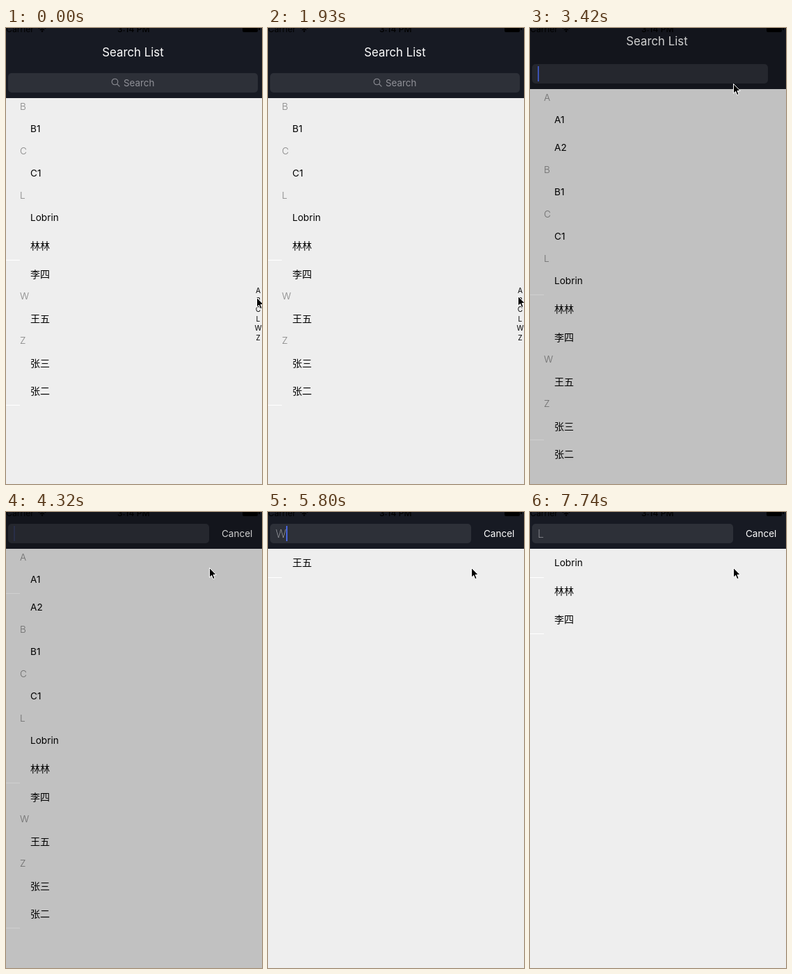
These frames come from a looping animation (368x657 px, 8000 ms). An HTML page:

```html
<!DOCTYPE html>
<html lang="zh-Hans">
<head>
<meta charset="utf-8">
<title>Search List</title>
<style>
html, body { margin: 0; width: 100%; height: 100%; overflow: hidden; background: #eee; }
body { position: relative; font: 13.6px Inter, "Noto Sans CJK SC", "Noto Sans CJK", sans-serif; color: #000; }
body *, svg { position: absolute; white-space: pre; }
#list, #header { left: 0; width: 100%; overflow: hidden; }
#list { bottom: 0; background: #eee; }
#rows { left: 0; }
#header { top: 0; background: #171a23; }
.row { left: 35px; height: 40px; line-height: 40px; }
.row.zh { font-size: 14px; font-weight: 350; }
.head { left: 20px; height: 24px; line-height: 24px; color: #858585; font-weight: 300; }
.sep { left: 0; width: 20px; height: 1px; background: #fff; }
#index { left: 352px; width: 21px; }
#index span { width: 21px; height: 14px; line-height: 14px; font-size: 10.2px; text-align: center; }
#title { left: 0; width: 365px; height: 24px; line-height: 24px; font-size: 16.8px; text-align: center; color: #fff; }
#field { left: 3px; height: 28px; border-radius: 5px; background: #2d3038; color: #a3a4a9; }
#hint { left: 166px; top: 0; line-height: 28px; font-size: 13.4px; color: #909198; }
#lens { left: 148px; top: 7px; }
#query { left: 8px; top: 0; height: 28px; line-height: 28px; font-size: 16px; font-weight: 200; }
#caret { left: 100%; top: 3px; width: 2px; height: 22px; background: #4865dc; }
#cancel { line-height: 28px; color: #fff; font-size: 13.5px; }
#dim { inset: 0; background: #000; opacity: .19; }
.status { top: -8px; line-height: 20px; font-size: 12.2px; }
#pointer { left: 0; top: 0; overflow: visible; }
</style>
</head>
<body>
<div id="list"><div id="rows"></div></div>
<div id="index"></div>
<div id="header">
  <div id="title">Search List</div>
  <div id="field">
    <svg id="lens" width="14" height="14" fill="none" stroke="#909198" stroke-width="1.1"><circle cx="5.5" cy="5.5" r="4.3"/><path d="M8.6 8.6L12.4 12.4"/></svg>
    <span id="hint">Search</span>
    <span id="query"><i id="caret"></i></span>
  </div>
  <span id="cancel">Cancel</span>
</div>
<div id="dim"></div>
<span class="status" style="left:0">Carrier</span>
<svg style="left:46px;top:-3px" width="12" height="10" fill="none" stroke="#000" stroke-width="1.6"><path d="M.8 3.6Q6 -1 11.2 3.6M3 5.9Q6 3.2 9 5.9"/><circle cx="6" cy="7.6" r=".5"/></svg>
<span class="status" style="left:160px;font-weight:500">3:14 PM</span>
<div style="left:340px;top:-4px;width:22px;height:10px;border-radius:2px;background:#000"></div>
<div style="left:363px;top:-1px;width:1.5px;height:4px;background:#000"></div>
<svg id="pointer" width="12" height="18"><path d="M.5 .5V14.2L3.6 11.3L5.7 16.6L8.1 15.6L6 10.5H10.2Z" fill="#000" stroke="#fff" stroke-width="1"/></svg>
<script>
const LOOP = 8000, TICK = 148.8;
const TOP = 101, HEAD_H = 23.4, ROW_H = 40.6, LETTER_H = 13.5;
const OPEN_AT = 3288, OPEN_MS = 385;

const groups = {
  A: ['A1', 'A2'], B: ['B1'], C: ['C1'],
  L: ['Lobrin', '林林', '李四'], W: ['王五'], Z: ['张三', '张二']
};
const letters = Object.keys(groups);

// Pointer stops: ms, x, y
const stops = [
  [0, 360, 388], [446, 360, 403], [595, 360, 403], [893, 360, 415],
  [1190, 360, 415], [2232, 359, 379], [2530, 359, 379], [3124, 292, 80]
];
// Field contents from each key press on
const keys = [[3800, ''], [4395, 'A'], [5140, ''], [5800, 'W'], [6625, ''], [7070, 'L']];

const $ = id => document.getElementById(id);
const px = n => n + 'px';
const clamp = n => Math.min(1, Math.max(0, n));
const ease = n => (n = clamp(n)) * n * (3 - 2 * n);

function pointerAt(t) {
  const i = stops.findLastIndex(s => s[0] <= t);
  const [t0, x0, y0] = stops[i];
  const [t1, x1, y1] = stops[i + 1] || [LOOP, x0, y0];
  const p = ease((t - t0) / (t1 - t0));
  return [x0 + (x1 - x0) * p, y0 + (y1 - y0) * p];
}

function add(cls, top, text = '', parent = $('rows')) {
  const el = document.createElement('span');
  el.className = cls;
  el.style.top = px(top);
  el.textContent = text;
  parent.append(el);
}

// Hairlines only show when they fall in the upper half of a pixel
function addLine(y, edge) {
  const pos = edge + y + .05;
  if (pos % 1 < .5) add('sep', Math.floor(pos) - Math.round(edge));
}

function buildRows(query, edge) {
  $('rows').replaceChildren();
  let y = 0;
  for (const letter of query ? [query] : letters) {
    if (!query) {
      add('head', y - .4, letter);
      y += HEAD_H;
    }
    groups[letter].forEach((name, i, all) => {
      add(/[^ -~]/.test(name) ? 'row zh' : 'row', y + .3, name);
      y += ROW_H;
      if (query || letter === 'Z' || i < all.length - 1) addLine(y, edge);
    });
  }
}

function sectionTop(n) {
  return Math.floor(letters.slice(0, n).reduce((sum, k) => sum + HEAD_H + groups[k].length * ROW_H, 0));
}

const queryText = document.createTextNode('');
$('query').prepend(queryText);
letters.forEach((k, i) => add('', 371 + i * LETTER_H, k, $('index')));

let lastKey = '';
function draw(t) {
  const [x, y] = pointerAt(t);
  const open = ease((t - OPEN_AT) / OPEN_MS);
  const [keyAt, query] = keys.findLast(k => k[0] <= t) || keys[0];
  const dimmed = open > 0 && t < keys[1][0];
  const lift = 48 * open;
  const top = Math.round(TOP - lift);
  const fieldTop = top - 36;
  const section = Math.max(0, Math.floor((y - 371) / LETTER_H));

  const key = query + top;
  if (key !== lastKey) {
    buildRows(query, TOP - lift - (query ? .6 : 0));
    lastKey = key;
  }
  $('list').style.top = px(top);
  $('rows').style.top = px(query ? 0 : -sectionTop(section));
  $('index').style.top = px(-lift);
  $('index').style.display = dimmed || query ? 'none' : '';

  $('header').style.height = px(top);
  $('title').style.top = px(Math.round(23 - 58 * open));
  $('field').style.top = px(fieldTop);
  $('field').style.width = px(359 - 70 * open);
  $('hint').style.display = $('lens').style.display = open ? 'none' : '';
  queryText.data = query;
  $('caret').style.opacity = open ? clamp((530 - (t - keyAt)) / 80) : 0;
  $('cancel').style.top = px(fieldTop);
  $('cancel').style.left = px(310 + 90 * (1 - open));
  $('dim').style.display = dimmed ? '' : 'none';
  $('pointer').style.transform = `translate(${Math.round(x)}px, ${Math.round(y)}px)`;
}

// The screen refreshes in coarse ticks
const start = performance.now();
function tick() {
  const t = (performance.now() - start) % LOOP;
  draw(Math.floor((t + 10) / TICK) * TICK);
  requestAnimationFrame(tick);
}
tick();
</script>
</body>
</html>
```
